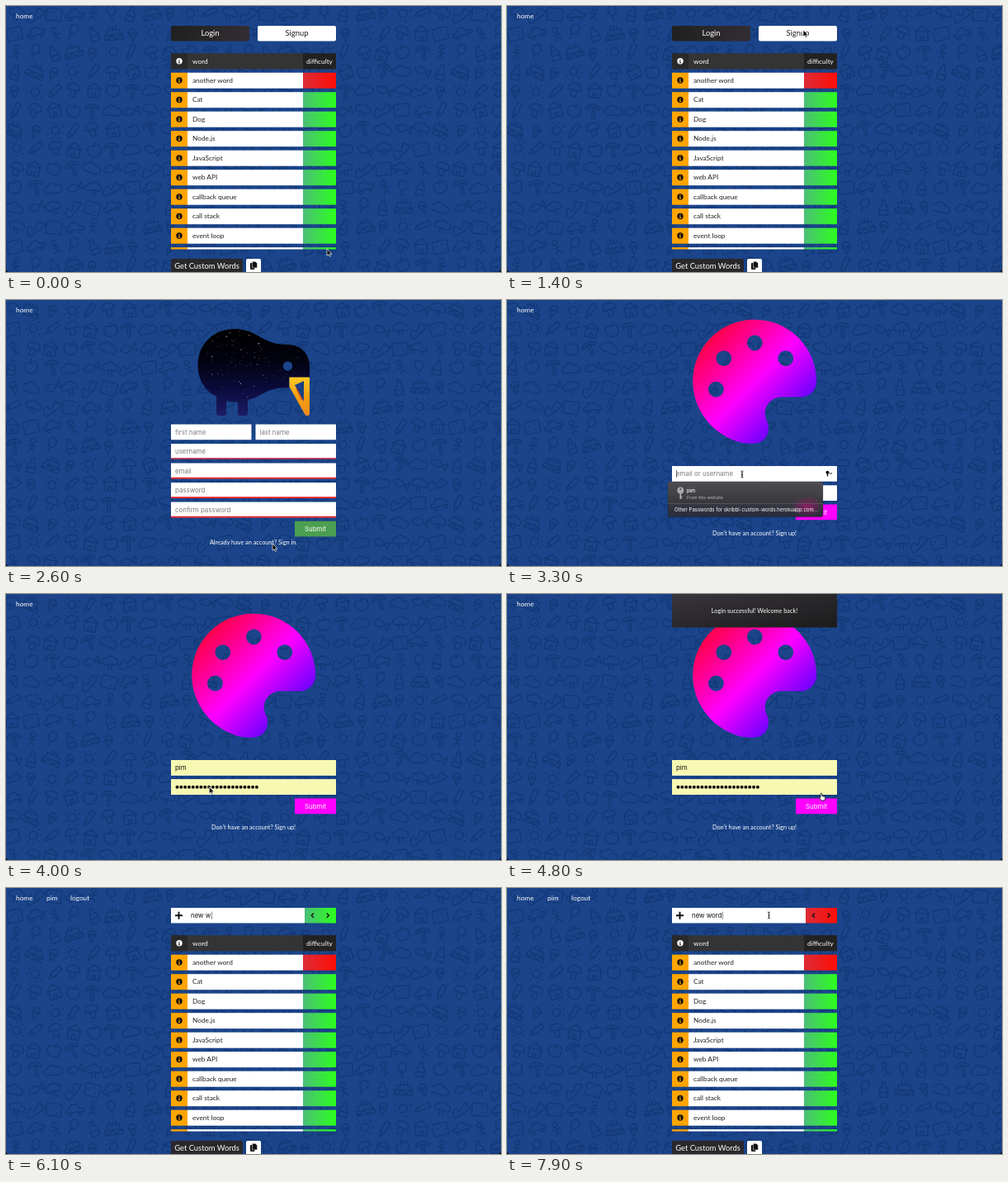
An HTML page for the animation above (8000 ms loop, 600 px wide and 322 px high).

```html
<!DOCTYPE html>
<html lang="en">
<head>
<meta charset="utf-8">
<title>Custom words</title>
<style>
html, body { margin: 0; width: 100%; height: 100%; overflow: hidden; background: #000; }
svg { display: block; width: 600px; height: 322px; border-radius: 0 0 4px 4px; }
text { font: 400 8.3px Lato, sans-serif; fill: #fff; }
.row { fill: #222; }
.big { font-size: 9.4px; }
.small { font-size: 7.3px; }
.ui { font: 400 7.9px Inter, sans-serif; }
.hint { fill: #7a7a7a; }
.typed { fill: #111; }
.mid { text-anchor: middle; }
</style>
</head>
<body>
<svg id="stage" viewBox="0 0 600 322"></svg>
<script>
const stage = document.getElementById('stage');
const USER = 'pim';
const BLUE = '#1b448a';

const rect = (x, y, w, h, fill, rx = 0) =>
  `<rect x="${x}" y="${y}" width="${w}" height="${h}" fill="${fill}" rx="${rx}"/>`;
const text = (x, y, s, cls = '', id = '') => `<text x="${x}" y="${y}" class="${cls}" id="${id}">${s}</text>`;
const circle = (x, y, r, fill) => `<circle cx="${x}" cy="${y}" r="${r}" fill="${fill}"/>`;
const path = (d, fill, more = '') => `<path d="${d}" fill="${fill}" ${more}/>`;
const line = (d, color, width) => path(d, 'none', `stroke="${color}" stroke-width="${width}"`);
const group = (id, ...parts) => `<g id="${id}">${parts.join('')}</g>`;
const repeat = (n, f) => Array.from({ length: n }, (_, i) => f(i)).join('');
const gradient = (id, colors, more = '') => `<linearGradient id="${id}" ${more}>` +
  colors.map((c, i) => `<stop offset="${i / (colors.length - 1)}" stop-color="${c}"/>`).join('') +
  '</linearGradient>';

function random(seed) {
  return () => (seed = (seed * 16807) % 2147483647) / 2147483647;
}

// Doodles, each centred on 0,0
const doodles = [
  'M-11 8H11V2H-11ZM-8 2V-4H8V2M-11 5q3 3 5.5 0t5.5 0 5.5 0 5.5 0M-4-4V-9M0-4V-9M4-4V-9',
  'M-7 9V-2H7V9ZM-9-2L0-9 9-2ZM-2 9V4H2V9',
  'M-2 9V2M2 9V2M-3 2a4 4 0 1 1-2-7a6 6 0 0 1 10 0a4 4 0 1 1-2 7Z',
  'M0 2a5 6 0 1 1 .1 0q-4 3 0 7',
  'M-8 8l2-6 10-10 4 4-10 10ZM-6 2l4 4',
  'M-8 5a4 4 0 0 1 0-8 6 6 0 0 1 11-1 4.5 4.5 0 0 1 4 9Z',
  'M-11 3V-1h4l3-5h7l3 5h5v4ZM-6 3a2 2 0 1 0 .1 0M6 3a2 2 0 1 0 .1 0',
  'M-5-1L0 9 5-1ZM-5-1a5 5 0 1 1 10 0M-3 3L3-1',
  'M0-4q-8-4-8 4t8 8q8 0 8-8t-8-4q0-3 3-5',
  'M-11 4q3-9 6-4t6-2 5-4 5 3-4 5-5 3-6 3-7-4M6-4h1',
  'M-2-9H2V-4L5 0V9H-5V0L-2-4ZM-5 3H5',
  'M-8 0q0-8 8-8t8 8ZM-3 0V8H3V0',
  'M-10 0q8-9 15 0l5-5v10l-5-5q-7 9-15 0M-5-1h1',
  'M0-2a3 3 0 1 1 .1 0V4M-5 1H5M0 4L-4 9M0 4L4 9',
  'M0 5a5 5 0 1 1 .1 0M0-8V-10M0 8V10M-8 0H-10M8 0H10M-6-6l-2-2M6-6l2-2M-6 6l-2 2M6 6l2 2',
  'M-9-4q9-9 18 0l-2 2q-7-6-14 0ZM-1-6V9H2V-6',
  'M-9 8H9V-1q3-6-4-6H-5q-7 0-4 6ZM-4-2v2M2-4v2M4 3v2'
];
const TILE = 258, CELLS = 11, CELL = TILE / CELLS;
const dice = random(41);
const wallpaper = repeat(CELLS * CELLS, i => {
  const row = Math.floor(i / CELLS);
  const x = (i % CELLS + .5) * CELL + dice() * 3 - 1.5;
  const y = (row + .5) * CELL + dice() * 3 - 1.5;
  const d = doodles[(i * 7 + row * 5) % doodles.length];
  return `<path d="${d}" transform="translate(${x} ${y}) rotate(${dice() * 50 - 25})"/>`;
});

const defs = `<defs>
  <pattern id="doodles" width="${TILE}" height="${TILE}" patternUnits="userSpaceOnUse">
    <rect width="${TILE}" height="${TILE}" fill="${BLUE}"/>
    <g fill="none" stroke="#123978" stroke-width="1.6" stroke-linejoin="round">${wallpaper}</g>
  </pattern>
  ${gradient('green', ['#4cbf78', '#2cff1c'])}
  ${gradient('orange', ['#e8a83c', '#ffa500'])}
  ${gradient('red', ['#dd2c38', '#ff0d05'])}
  ${gradient('dark', ['#202020', '#332d33'])}
  ${gradient('banner', ['#39363c', '#2a282b', '#1c1b1c'], 'x2="1" y2="1"')}
  ${gradient('panel', ['#4e4d50', '#3c3b40', '#282b3c'], 'x2="0" y2="1"')}
  ${gradient('paint', ['#f00', '#f0f', '#00f'], 'x2="1" y2="1"')}
  ${gradient('night', ['#000', '#02020c', '#0a0a38', '#1c1c66'], 'gradientUnits="userSpaceOnUse" x1="0" x2="0" y1="35" y2="140"')}
  ${gradient('beak', ['#ffc928', '#f5a010', '#f08a1c'], 'x2="0" y2="1"')}
  <radialGradient id="glow"><stop stop-color="#a0186c" stop-opacity=".8"/><stop offset="1" stop-color="#a0186c" stop-opacity="0"/></radialGradient>
</defs>`;

// Word list
const words = ['another word', 'Cat', 'Dog', 'Node.js', 'JavaScript', 'web API',
  'callback queue', 'call stack', 'event loop', ''];
const info = (x, y, dot, mark) => circle(x, y, 3.7, dot) +
  line(`M${x} ${y - 2.3}v1.2M${x - .8} ${y - .3}h.8v2.2M${x - 1.1} ${y + 2}h2.2`, mark, 1);
const wordRow = (word, i) => {
  const y = 80.7 + 23.5 * i, h = word ? 19 : 2.3;
  return rect(200, y, 20, h, '#ffa500') + rect(220, y, 140, h, '#fff') +
    rect(360, y, 40, h, i ? 'url(#green)' : 'url(#red)') +
    (word && info(210, y + 9.3, '#111', '#ffa500') + text(226, y + 11.8, word, 'row'));
};
const list = group('list',
  rect(200, 57.3, 200, 19, '#343434'), rect(200, 57.3, 20, 19, '#292929'), rect(360, 57.3, 40, 19, '#222'),
  info(210, 66.8, '#fff', '#292929'), text(226, 69.8, 'word'), text(380, 69.8, 'difficulty', 'mid'),
  words.map(wordRow).join(''),
  rect(200, 306, 87, 20, '#2a282b', 2), text(243.5, 318, 'Get Custom Words', 'big mid'),
  rect(291, 306, 18, 20, '#fff', 2),
  rect(296, 311, 5.5, 8, '#111', 1),
  path('M298.5 309.3h3.7l2.3 2.3v5.4h-6Z', '#111', 'stroke="#fff" stroke-width=".5"'));

const guest = group('guest',
  rect(200, 24, 95, 18.5, 'url(#dark)', 2), text(247.5, 36.4, 'Login', 'big mid'),
  rect(305, 24, 95, 18.5, '#fff', 2),
  '<text x="352.5" y="36.4" class="big mid" style="fill:#222">Signup</text>');

const member = group('member',
  rect(200, 24, 162, 18.5, '#fff'), line('M205 33.2h9M209.5 28.7v9', '#111', 1.9),
  text(224, 36, '', 'ui typed', 'word'),
  '<rect id="level" x="362" y="24" width="38" height="18.5"/>',
  line('M373 30.4l-2.7 2.8 2.7 2.8M388.7 30.4l2.7 2.8-2.7 2.8', '#151515', 1.4));

// Account forms
const field = (x, y, w, hint, edge) => rect(x, y, w, 18.7, '#fff') +
  (edge ? rect(x, y + 17.2, w, 1.8, edge) : '') + text(x + 5, y + 12.2, hint, 'ui hint');
const submit = (y, color) => rect(350, y, 50, 18.7, color) + text(375, y + 12.2, 'Submit', 'ui mid');

const star = random(7);
const stars = repeat(90, () => {
  const a = star() * 6.283, r = Math.sqrt(star());
  return circle(277 + Math.cos(a) * r * 42, 79 + Math.sin(a) * r * 42, .2 + star() * .45,
    ['#8a8ac0', '#50508a', '#b0a0b0'][Math.floor(star() * 3)]);
}) + repeat(30, () => circle(315 + star() * 48, 66 + star() * 34, .2 + star() * .35, '#66669a'));

const bird = path('M277 35C289 35 298 39 305 43C318 51 328 54 341 54C357 54 368 65 368 81V94H343V106' +
  'C326 106 319 109 308 115C303 118 298 120 293 121V137q0 3-3 3h-6q-3 0-3-3V123.500' +
  'Q273 124 267 122V137q0 3-3 3h-6q-3 0-3-3V117C241 110 232.500 96 232.500 79C232.500 54 251 35 277 35Z', 'url(#night)') +
  stars + circle(341.5, 80, 5.7, BLUE) +
  path('M343.500 93.500H368V137C368 141 363.500 141 362 138L343.500 105ZM350 103L361 98V123Z',
    'url(#beak)', 'fill-rule="evenodd"') + line('M352 107L359 121', '#e0451c', 1.4);

const signup = group('signup', bird,
  field(200, 150.5, 97.5, 'first name'), field(302.5, 150.5, 97.5, 'last name'),
  ['username', 'email', 'password', 'confirm password']
    .map((s, i) => field(200, 174 + 23.5 * i, 200, s, i ? '#e8202a' : '#a82850')).join(''),
  submit(267.7, '#4b9f50'), text(300, 296.2, 'Already have an account? Sign in.', 'small mid'));

const hole = (x, y) => `M${x - 32} ${y}a32 32 0 1 0 64 0a32 32 0 1 0-64 0Z`;
const palette = path('M204 5C105 24 25 104 5 203C-32 390 137 530 264 510C305 504 325 456 306 418' +
  'C283 373 316 320 367 320H447C483 320 512 290 512 255C511 97 368-27 204 5Z' +
  hole(96, 288) + hole(128, 160) + hole(256, 96) + hole(384, 160),
  'url(#paint)', 'fill-rule="evenodd" transform="translate(225.3 23.7) scale(.293)"');

const popup = group('popup',
  line('M205.5 206v9', '#333', .7),
  circle(388.5, 208.7, 2, '#111'), line('M388.500 209v4.500', '#111', 1.4), line('M390.800 209l1.600 1.700 1.600-1.700', '#111', 1),
  rect(194.5, 220, 189, 43.5, '#0003', 3), rect(195, 220, 188, 42.5, 'url(#panel)', 3),
  '<ellipse cx="364" cy="250" rx="19" ry="12.500" fill="url(#glow)"/>',
  circle(210.3, 230.5, 3.9, '#aaa'), circle(210.3, 229, 1, '#444'), line('M210.300 233v8M210.300 238.500h2', '#aaa', 1.8),
  `<text x="218" y="233" class="ui" style="font-size:5.800px;font-weight:500">${USER}</text>`,
  '<text x="218" y="240.5" class="ui" style="font-size:5.3px;fill:#b8b8bd">From this website</text>',
  line('M195 246.500H383', '#65656a', .6),
  '<text x="203" y="256" class="ui" style="font-size:6px">Other Passwords for skribbl-custom-words.herokuapp.com...</text>');

const filled = group('filled',
  rect(200, 201, 200, 18.5, '#f7f9b2'), rect(200, 224.3, 200, 18.5, '#f7f9b2'),
  text(205, 213.2, USER, 'ui typed'), repeat(21, i => circle(207.5 + i * 4.82, 233.7, 2, '#111')));

const login = group('login', palette,
  field(200, 201, 200, 'email or username'), field(200, 224.3, 200, 'password'),
  submit(247.5, '#f0f'), text(300, 285, "Don't have an account? Sign up!", 'small mid'), filled, popup);

const toast = group('toast', rect(200, 0, 200, 40.5, 'url(#banner)'),
  text(300, 23, 'Login successful! Welcome back!', 'small mid'));

const cursors = group('pointer',
  `<g id="arrow">${path('M0 0V8.200L2 6.500 3.300 9.300 4.700 8.700 3.400 6H6Z', '#000', 'stroke="#fff" stroke-width=".7"')}</g>`,
  `<g id="beam">${line('M-1.600-4Q0-4 0-3V3Q0 4-1.600 4M1.600-4Q0-4 0-3V3Q0 4 1.600 4M-1 .8H1', '#222', .8)}</g>`,
  `<g id="hand">${path('M-1-3.500q1-1 1.800 0V-.5l3.200.8q1 .4.800 1.700L4 5H0L-2.800 1.400q.3-1 1.800 0Z', '#fff', 'stroke="#111" stroke-width=".8"')}</g>`);

stage.innerHTML = defs + rect(0, 0, 600, 322, 'url(#doodles)') +
  text(12, 14.5, 'home') + group('session', text(49, 14.5, USER), text(78, 14.5, 'logout')) +
  list + guest + member + signup + login + toast + cursors;

const $ = id => document.getElementById(id);
const show = (id, on) => $(id).setAttribute('display', on ? 'inline' : 'none');
const move = (id, x, y) => $(id).setAttribute('transform', `translate(${x} ${y})`);
const ease = (t, a, b) => {
  const k = Math.min(1, Math.max(0, (t - a) / (b - a)));
  return k * k * (3 - 2 * k);
};

// Pointer stops: time, x, y
const stops = [[0, 389, 294], [300, 389, 294], [1200, 359, 29], [1850, 359, 29], [2450, 323, 295],
  [2850, 323, 295], [3200, 285, 211], [3450, 285, 211], [3750, 240, 233], [3950, 240, 233],
  [4350, 381, 245], [4950, 381, 245], [5450, 290, 33], [6550, 290, 33], [6850, 390, 33],
  [7400, 390, 33], [7750, 317.5, 33], [8000, 317.5, 33]];
function pointerAt(t) {
  const i = Math.max(1, stops.findIndex(s => s[0] > t));
  const [a, b] = [stops[i - 1], stops[i]];
  const k = ease(t, a[0], b[0]);
  return [a[1] + (b[1] - a[1]) * k, a[2] + (b[2] - a[2]) * k];
}

const keys = [5650, 5750, 5850, 5950, 6050, 6200, 6320, 6450];

function draw(t) {
  const onSignup = t >= 1650 && t < 2800, onLogin = t >= 2800 && t < 5000;
  const home = !onSignup && !onLogin, signedIn = t >= 5000;
  show('list', home);
  show('guest', home && !signedIn);
  show('member', signedIn);
  show('session', signedIn);
  show('signup', onSignup);
  show('login', onLogin);
  show('popup', t >= 3250 && t < 3900);
  show('filled', t >= 3900);
  $('doodles').setAttribute('patternTransform', home ? 'translate(0 138)' : 'translate(20 0)');

  const typed = 'new word'.slice(0, keys.filter(k => k <= t).length);
  $('word').innerHTML = typed.replace(/ /g, '\u00a0') + (t >= 5500 ? '<tspan font-weight="300">|</tspan>' : '');
  $('level').setAttribute('fill', `url(#${t < 6950 ? 'green' : t < 7200 ? 'orange' : 'red'})`);

  move('toast', 0, 41 * (ease(t, 4450, 4700) - ease(t, 5120, 5380) - 1));

  const [x, y] = pointerAt(t);
  const overField = onLogin ? y > 201 && y < 219 && t < 3700 : signedIn && y < 42 && x < 362;
  const overButton = t > 4200 && t < 5000 || signedIn && t > 6550 && x >= 362;
  move('pointer', x, y);
  show('pointer', t < 5600 || t > 6550);
  show('beam', overField);
  show('hand', overButton);
  show('arrow', !overField && !overButton);
}

const start = performance.now();
function frame() {
  draw((performance.now() - start) % 8000);
  requestAnimationFrame(frame);
}
frame();
</script>
</body>
</html>
```
